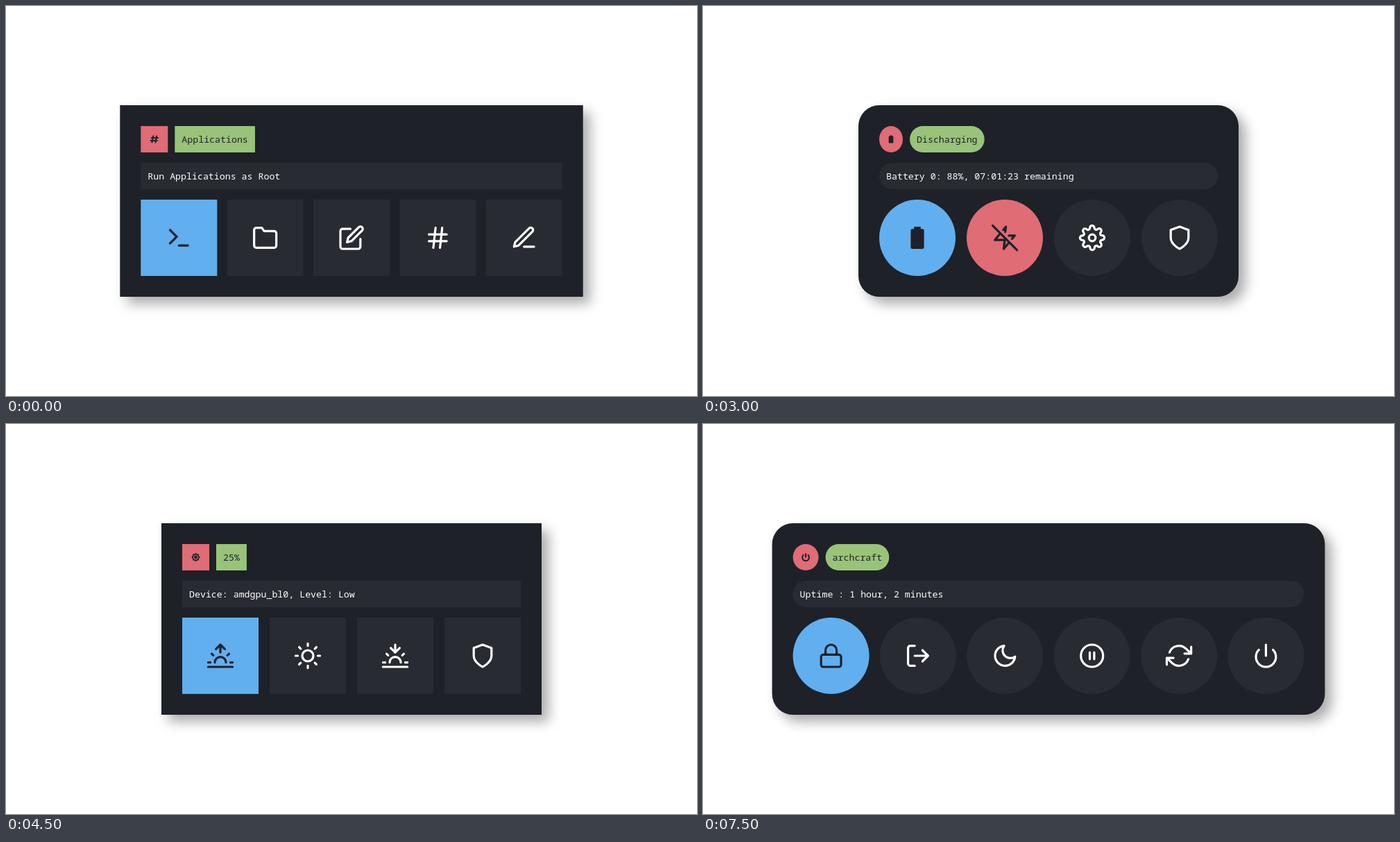
Recreate the animation shown at these times as an HTML page. Size 996x562 px, loop 8 s.

```html
<!DOCTYPE html>
<html lang="en">
<head>
<meta charset="utf-8">
<title>Applets</title>
<style>
html, body { margin: 0; width: 100%; height: 100%; overflow: hidden; background: #fff; }
svg { display: block; width: 100%; height: 100%; }
text { font: 13.28px "Noto Sans Mono", "DejaVu Sans Mono", monospace; white-space: pre; }
.card { fill: #1e2128; filter: drop-shadow(10px 10px 9px rgba(0, 0, 0, .33)); }
.icon { fill: none; stroke-width: 2; stroke-linecap: round; stroke-linejoin: round; }
.scene { visibility: hidden; animation: show 8s step-end infinite; }
.scene:last-child { animation-name: show-last; }
@keyframes show { 0% { visibility: visible; } 18.75%, 100% { visibility: hidden; } }
@keyframes show-last { 0% { visibility: visible; } 6.25%, 100% { visibility: hidden; } }
</style>
</head>
<body>
<svg id="stage" viewBox="0 0 996 562"></svg>
<script>
const DARK = '#1e2128', PANEL = '#282b31', WHITE = '#fff';
const BLUE = '#61afef', RED = '#e06c75', GREEN = '#98c379';
const CHAR = 7.97, TILE = 110;

const path = (d, attrs = '') => `<path d="${d}" ${attrs}/>`;
const circle = (x, y, r, attrs = '') => `<circle cx="${x}" cy="${y}" r="${r}" ${attrs}/>`;
const rect = (x, y, w, h, r, attrs = '') =>
  `<rect x="${x}" y="${y}" width="${w}" height="${h}" rx="${r}" ${attrs}/>`;
const text = (x, y, fill, s) => `<text x="${x}" y="${y}" fill="${fill}">${s}</text>`;
const spin = (n, shape) => Array.from({ length: n }, (_, i) =>
  `<g transform="rotate(${i * 360 / n} 12 12)">${shape}</g>`).join('');

const horizon = 'M17 18a5 5 0 0 0-10 0M4.22 10.22l1.42 1.42M1 18h2M21 18h2M18.36 11.64l1.42-1.42M23 22H1M12 2v7';
const gearQuarter = 'M19.4 15a1.65 1.65 0 0 0 .33 1.82l.06.06a2 2 0 0 1 0 2.83 2 2 0 0 1-2.83 0l-.06-.06' +
  'a1.65 1.65 0 0 0-1.82-.33 1.65 1.65 0 0 0-1 1.51V21a2 2 0 0 1-2 2 2 2 0 0 1-2-2v-.09A1.65 1.65 0 0 0 9 19.4';
const battery = 'M16.67 4H15V2H9v2H7.33A1.33 1.33 0 0 0 6 5.33v15.34C6 21.4 6.6 22 7.33 22h9.34' +
  'A1.33 1.33 0 0 0 18 20.67V5.33C18 4.6 17.4 4 16.67 4z';

// Tile icons on a 24-unit grid
const icons = {
  terminal: path('M4 17l6-6-6-6M12 19h8'),
  folder: path('M22 19a2 2 0 0 1-2 2H4a2 2 0 0 1-2-2V5a2 2 0 0 1 2-2h5l2 3h9a2 2 0 0 1 2 2z'),
  edit: path('M11 4H4a2 2 0 0 0-2 2v14a2 2 0 0 0 2 2h14a2 2 0 0 0 2-2v-7M18.5 2.5a2.121 2.121 0 0 1 3 3L12 15l-4 1 1-4z'),
  hash: path('M4 9h16M4 15h16M10 3L8 21M16 3l-2 18'),
  pen: path('M12 20h9M16.5 3.5a2.121 2.121 0 0 1 3 3L7 19l-4 1 1-4z'),
  globe: circle(12, 12, 10) + path('M2 12h20M12 2a15.3 15.3 0 0 1 0 20 15.3 15.3 0 0 1 0-20z'),
  music: path('M9 18V5l12-2v13') + circle(6, 18, 3) + circle(18, 16, 3),
  gear: circle(12, 12, 3) + spin(4, path(gearQuarter)),
  battery: path(battery, `fill="${DARK}" stroke="none"`),
  zapOff: path('M12.41 6.75L13 2l-2.43 2.92M18.57 12.91L21 10h-5.34M8 8l-5 6h9l-1 8 5-6M1 1l22 22'),
  shield: path('M12 22s8-4 8-10V5l-8-3-8 3v7c0 6 8 10 8 10z'),
  sunrise: path(horizon + 'M8 6l4-4 4 4'),
  sun: circle(12, 12, 5) + spin(8, path('M12 1v2')),
  sunset: path(horizon + 'M16 5l-4 4-4-4'),
  play: path('M5 3l14 9-14 9z'),
  stop: rect(3, 3, 18, 18, 2),
  previous: path('M19 20L9 12l10-8zM5 19V5'),
  next: path('M5 4l10 8-10 8zM19 5v14'),
  repeat: path('M17 1l4 4-4 4M3 11V9a4 4 0 0 1 4-4h14M7 23l-4-4 4-4M21 13v2a4 4 0 0 1-4 4H3'),
  shuffle: path('M16 3h5v5M4 20L21 3M21 16v5h-5M15 15l6 6M4 4l5 5'),
  lock: rect(3, 11, 18, 11, 2) + path('M7 11V7a5 5 0 0 1 10 0v4'),
  logout: path('M9 21H5a2 2 0 0 1-2-2V5a2 2 0 0 1 2-2h4M16 17l5-5-5-5M21 12H9'),
  moon: path('M21 12.79A9 9 0 1 1 11.21 3 7 7 0 0 0 21 12.79z'),
  pause: circle(12, 12, 10) + path('M10 15V9M14 15V9'),
  refresh: path('M23 4v6h-6M1 20v-6h6M3.51 9a9 9 0 0 1 14.85-3.36L23 10M1 14l4.64 4.36A9 9 0 0 0 20.49 15'),
  power: path('M18.36 6.64a9 9 0 1 1-12.73 0M12 2v10'),
};

// Badge glyphs in pixels around their centre
const stroke = `fill="none" stroke="${DARK}" stroke-width="2"`;
const badges = {
  hash: path('M-4.8-2.1H6M-6 2.1H4.8M-1.5-5.4L-3.5 5.4M3.5-5.4L1.5 5.4', stroke),
  grid: [-6.3, .4].map(x => [-5.2, .4].map(y => rect(x, y, 5.9, 4.8, .8)).join('')).join(''),
  battery: path(battery, 'transform="scale(.56) translate(-12 -12)"'),
  sun: [0, 45].map(a => rect(-4.5, -4.5, 9, 9, .6, `transform="rotate(${a})"`)).join('') +
    circle(0, 0, 3, `fill="none" stroke="${RED}" stroke-width="1.2"`),
  music: path('M-2.5-4.2L5.7-6.2V3H4.2V-2.4L-1-1V4.5H-2.5z') +
    '<ellipse cx="-3.6" cy="4.4" rx="2.6" ry="1.9"/><ellipse cx="3.1" cy="2.9" rx="2.6" ry="1.9"/>',
  power: path('M-2.9-3.6A4.9 4.9 0 1 0 2.9-3.6M0-5.8V.4', stroke),
};

const scenes = [
  { x: 164.3, radius: 0, badge: 'hash', badgeW: 39, tag: 'Applications', line: 'Run Applications as Root',
    tiles: 'terminal folder edit hash pen' },
  { x: 99.6, radius: 12, badge: 'grid', badgeW: 38, tag: 'Applications', line: 'Installed Packages : 1408 (pacman)',
    tiles: 'terminal folder edit globe music gear' },
  { x: 224, radius: 30, badge: 'battery', badgeW: 34, tag: 'Discharging', line: 'Battery 0: 88%, 07:01:23 remaining',
    tiles: 'battery zapOff gear shield', colors: { 1: RED } },
  { x: 224, radius: 0, badge: 'sun', badgeW: 39, tag: '25%', line: 'Device: amdgpu_bl0, Level: Low',
    tiles: 'sunrise sun sunset shield' },
  { x: 99.6, radius: 12, badge: 'music', badgeW: 37, tag: 'Marcellus Tanglewicke', line: 'A Day Beyond Rains :: 1:03/3:23',
    tiles: 'play stop previous next repeat shuffle', colors: { 4: GREEN, 5: RED } },
  { x: 99.6, radius: 30, badge: 'power', badgeW: 37, tag: 'archcraft', line: 'Uptime : 1 hour, 2 minutes',
    tiles: 'lock logout moon pause refresh power' },
];

function drawTile(name, x, radius, color) {
  const ink = color === PANEL ? WHITE : DARK;
  return rect(x, 279, TILE, TILE, radius, `fill="${color}"`) +
    `<g class="icon" stroke="${ink}" transform="translate(${x + TILE / 2} 334) scale(1.6) translate(-12 -12)">${icons[name]}</g>`;
}

function drawScene({ x, radius, badge, badgeW, tag, line, tiles, colors = {} }, i) {
  const width = 996 - 2 * x, left = x + 30, inner = width - 60;
  const round = radius === 30;
  const pill = round ? 19 : radius;
  const tagX = left + badgeW + 10;
  const names = tiles.split(' ');
  const pitch = (inner - TILE) / (names.length - 1);
  return `<g class="scene" style="animation-delay:${i * 1.5 - 8}s">` +
    rect(x, 143, width, 276, radius, 'class="card"') +
    rect(left, 173, badgeW, 38, pill, `fill="${RED}"`) +
    `<g fill="${DARK}" transform="translate(${left + badgeW / 2} 192)">${badges[badge]}</g>` +
    rect(tagX, 173, tag.length * CHAR + 20, 38, pill, `fill="${GREEN}"`) +
    text(tagX + 10, 197, DARK, tag) +
    rect(left, 226, inner, 38, pill, `fill="${PANEL}"`) +
    text(left + 10, 250, WHITE, line) +
    names.map((name, n) => drawTile(name, left + n * pitch, round ? TILE / 2 : radius,
      colors[n] || (n ? PANEL : BLUE))).join('') +
    '</g>';
}

document.getElementById('stage').innerHTML = scenes.map(drawScene).join('');
</script>
</body>
</html>
```
